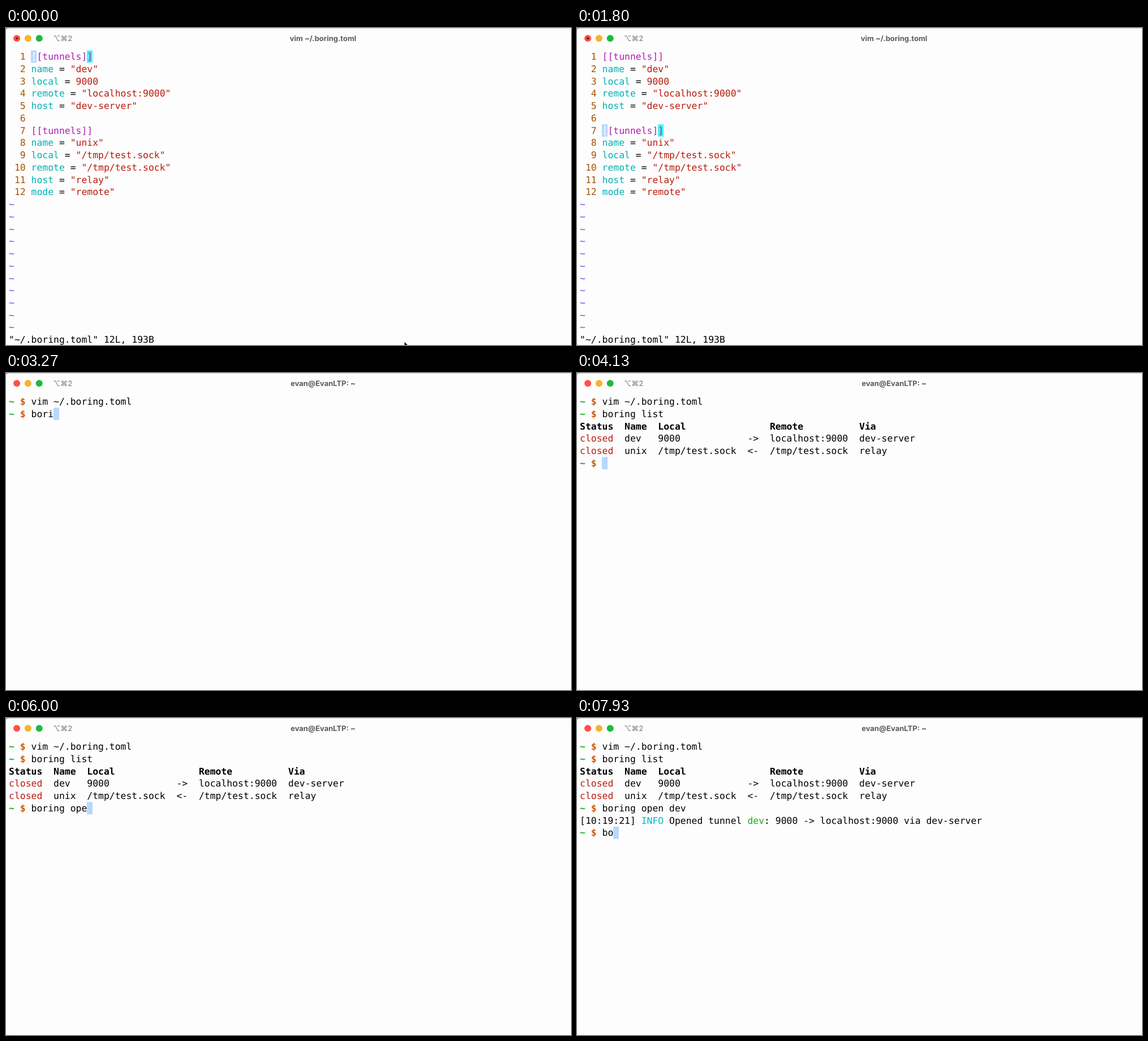
Animation, 999 px wide and 560 px high, one loop 8000 ms. Source, as an HTML page:

```html
<!DOCTYPE html>
<html lang="en">
<head>
<meta charset="utf-8">
<title>Terminal session</title>
<style>
html, body { margin: 0; width: 100%; height: 100%; overflow: hidden; background: #fdfdfd; }
svg { display: block; width: 999px; height: 560px; text-rendering: geometricPrecision; }
.mono { font: 16.41px "DejaVu Sans Mono", monospace; }
.mono text { white-space: pre; }
.bar { font: 700 13px Inter, sans-serif; }
</style>
</head>
<body>
<svg viewBox="0 0 999 560">
  <rect width="999" height="560" fill="#aaa8a5"/>
  <rect x="-2" y="0.5" width="1020" height="561" rx="8" fill="#fdfdfd"/>
  <circle cx="19.1" cy="18.3" r="6" fill="#ff5148"/>
  <circle id="dot" cx="19.1" cy="18.3" r="2.1" fill="#860c06"/>
  <circle cx="38.9" cy="18.3" r="6" fill="#f7b32b"/>
  <circle cx="58.7" cy="18.3" r="6" fill="#1fb93c"/>
  <g class="bar">
    <text x="83" y="23" fill="#85858a" font-weight="500">⌥⌘2</text>
    <text id="title" x="560.5" y="23" fill="#5b5b5e" text-anchor="middle"></text>
  </g>
  <g id="screen" class="mono"></g>
  <path id="mouse" d="M704.5 554.5V560H710Z" fill="#111"/>
</svg>
<script>
const LOOP = 8000, X0 = 5, Y0 = 39.7, CW = 9.88, LH = 21.74;
const C = {
  ink: '#000', num: '#a35400', key: '#00b0b3', str: '#b81c0c', head: '#b01cb3',
  tilde: '#5b50ea', ok: '#14ad1c', sign: '#d0590c', cursor: '#b7d8ff', match: '#45f5f5'
};
const $ = id => document.getElementById(id);
const esc = s => s.replace(/&/g, '&amp;').replace(/</g, '&lt;').replace(/>/g, '&gt;');

function put(row, col, str, fill = C.ink, bold = false) {
  return `<text x="${(X0 + col * CW).toFixed(2)}" y="${(Y0 + row * LH + 16.5).toFixed(2)}"` +
    ` fill="${fill}"${bold ? ' font-weight="700"' : ''}>${esc(str)}</text>`;
}

function cell(row, col, fill, ch = '', ink = '#fff') {
  const box = `<rect x="${Math.floor(X0 + col * CW)}" y="${(Y0 + row * LH).toFixed(2)}"` +
    ` width="10" height="${LH}" fill="${fill}"/>`;
  return box + (ch && put(row, col, ch, ink));
}

// Editor
const FILE = [
  '[[tunnels]]', 'name = "dev"', 'local = 9000', 'remote = "localhost:9000"', 'host = "dev-server"', '',
  '[[tunnels]]', 'name = "unix"', 'local = "/tmp/test.sock"', 'remote = "/tmp/test.sock"',
  'host = "relay"', 'mode = "remote"'
];

function editor(line, command) {
  let out = '';
  FILE.forEach((s, i) => {
    out += put(i, 0, String(i + 1).padStart(3), C.num);
    if (s[0] === '[') {
      out += put(i, 4, s, C.head);
    } else if (s) {
      const [key, val] = s.split(' = ');
      out += put(i, 4, key, C.key) + put(i, 5 + key.length, '=') + put(i, 7 + key.length, val, C.str);
    }
  });
  for (let i = FILE.length; i < 23; i++) out += put(i, 0, '~', C.tilde);
  if (command) return out + put(23, 0, command) + cell(23, command.length, C.cursor);

  out += put(23, 0, '"~/.boring.toml" 12L, 193B');
  const s = FILE[line];
  if (s[0] === '[') out += cell(line, 3 + s.length, C.match, ']', C.head);
  return out + cell(line, 4, C.cursor, s[0]);
}

// Shell
const prompt = (row, cmd) =>
  put(row, 0, '~', C.ok, true) + put(row, 2, '$', C.sign, true) + put(row, 4, cmd);
const active = (row, cmd) => prompt(row, cmd) + cell(row, 4 + cmd.length, C.cursor);

const COLS = [0, 8, 14, 30, 34, 50];
const TABLE = [
  ['Status', 'Name', 'Local', '', 'Remote', 'Via'],
  ['closed', 'dev', '9000', '->', 'localhost:9000', 'dev-server'],
  ['closed', 'unix', '/tmp/test.sock', '<-', '/tmp/test.sock', 'relay']
];

function table(row) {
  return TABLE.map((cells, r) => cells.map((s, i) =>
    s && put(row + r, COLS[i], s, r && !i ? C.str : C.ink, !r)).join('')).join('');
}

function log(row) {
  return put(row, 0, '[10:19:21]') + put(row, 11, 'INFO', '#00b9c6') + put(row, 16, 'Opened tunnel') +
    put(row, 30, 'dev', C.ok) + put(row, 33, ': 9000 -> localhost:9000 via dev-server');
}

// Number of steps done when each takes `gap` ms
const steps = (t, from, gap) => t < from ? 0 : 1 + Math.floor((t - from) / gap);
const type = (s, t, from, gap) => s.slice(0, steps(t, from, gap));

function shell(t) {
  let out = prompt(0, 'vim ~/.boring.toml');
  if (t < 4070) {
    const cmd = t < 3670 ? type('boring ', t, 2930, 100) : 'boring ' + type('list', t, 3670, 90);
    return out + active(1, cmd);
  }
  out += prompt(1, 'boring list') + table(2);
  if (t < 6670) return out + active(5, type('boring open dev', t, 5080, 98));
  out += prompt(5, 'boring open dev');
  if (t < 6870) return out + cell(6, 0, C.cursor);
  return out + log(6) + active(7, type('bo', t, 7790, 110));
}

let last = '';
function draw(t) {
  const vim = t < 2600;
  const html = vim
    ? editor(Math.min(6, steps(t, 330, 135)), type(':q', t, 2270, 135))
    : shell(t);
  if (html !== last) $('screen').innerHTML = last = html;
  $('title').textContent = vim ? 'vim ~/.boring.toml' : 'evan@EvanLTP: ~';
  $('dot').style.display = vim ? '' : 'none';
  $('mouse').style.display = t < 70 ? '' : 'none';
}

function tick() {
  draw(performance.now() % LOOP);
  requestAnimationFrame(tick);
}
tick();
</script>
</body>
</html>
```
